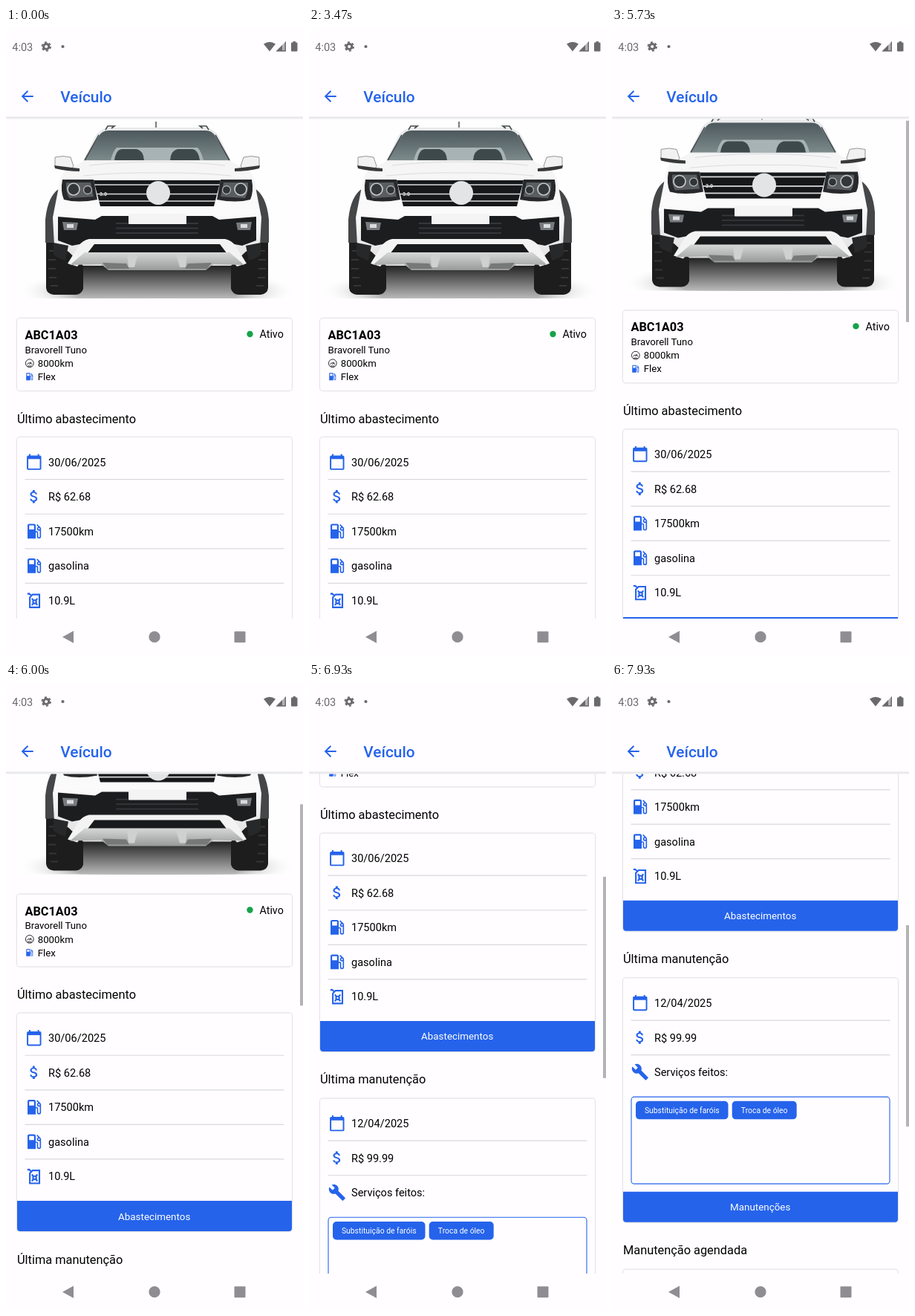
An HTML page that plays this animation: 400x844 px, repeating every 8000 ms.

```html
<!DOCTYPE html>
<html lang="pt-BR">
<head>
<meta charset="utf-8">
<title>Veículo</title>
<style>
  html, body { margin: 0; width: 100%; height: 100%; overflow: hidden; background: #fffdff; }
  svg { display: block; width: 100%; height: 100%; font-family: Roboto, sans-serif; }
  .card { fill: #fffdff; filter: drop-shadow(0 .8px 1.2px rgba(0, 0, 0, .28)); }
  .blue { fill: #2563eb; }
  .line { stroke: #d9d8db; stroke-width: 1.2; }
  .h { font-size: 16.35px; }
  .row { font-size: 14.55px; }
  .small { font-size: 13.2px; }
  .btn { font-size: 13.4px; fill: #fff; text-anchor: middle; }
  .chip { font-size: 10.4px; fill: #fff; text-anchor: middle; }
</style>
</head>
<body>
<svg viewBox="0 0 400 844">
  <defs>
    <clipPath id="view"><rect y="121" width="400" height="674"/></clipPath>
    <clipPath id="photo"><rect x="15" y="121" width="370" height="243"/></clipPath>
    <radialGradient id="ground">
      <stop offset="0" stop-color="#4a4a4a"/><stop offset=".55" stop-color="#999"/>
      <stop offset="1" stop-color="#fff" stop-opacity="0"/>
    </radialGradient>
    <linearGradient id="under" x2="0" y2="1">
      <stop offset="0" stop-color="#1c1c1c"/><stop offset="1" stop-color="#b9b9b9"/>
    </linearGradient>
    <linearGradient id="glass" x2="0" y2="1">
      <stop offset="0" stop-color="#4c585b"/><stop offset="1" stop-color="#7d8a8c"/>
    </linearGradient>
    <linearGradient id="paint" x2="0" y2="1">
      <stop offset="0" stop-color="#f4f4f5"/><stop offset=".5" stop-color="#fbfbfc"/>
      <stop offset="1" stop-color="#dededf"/>
    </linearGradient>
    <linearGradient id="skid" x2="0" y2="1">
      <stop offset="0" stop-color="#d6d7d7"/><stop offset="1" stop-color="#989a9a"/>
    </linearGradient>

    <path id="date" d="M20 3h-1V1h-2v2H7V1H5v2H4c-1.1 0-2 .9-2 2v16c0 1.1.9 2 2 2h16c1.1 0 2-.9 2-2V5c0-1.1-.9-2-2-2zm0 18H4V8h16v13z"/>
    <path id="money" d="M11.8 10.9c-2.27-.59-3-1.2-3-2.15 0-1.09 1.01-1.85 2.7-1.85 1.78 0 2.44.85 2.5 2.1h2.21c-.07-1.72-1.12-3.3-3.21-3.81V3h-3v2.16c-1.94.42-3.5 1.68-3.5 3.61 0 2.31 1.91 3.46 4.7 4.13 2.5.6 3 1.48 3 2.41 0 .69-.49 1.79-2.7 1.79-2.06 0-2.87-.92-2.98-2.1h-2.2c.12 2.19 1.76 3.42 3.68 3.83V21h3v-2.15c1.95-.37 3.5-1.5 3.5-3.55 0-2.84-2.43-3.81-4.7-4.4z"/>
    <path id="fuel" d="M18 10a1 1 0 0 1-1-1 1 1 0 0 1 1-1 1 1 0 0 1 1 1 1 1 0 0 1-1 1m-6 0H6V5h6m7.77 2.23l.01-.01-3.72-3.72L15 4.56l2.11 2.11C16.17 7 15.5 7.93 15.5 9a2.5 2.5 0 0 0 2.5 2.5c.36 0 .69-.08 1-.21v7.21a1 1 0 0 1-1 1 1 1 0 0 1-1-1V14a2 2 0 0 0-2-2h-1V5a2 2 0 0 0-2-2H6c-1.11 0-2 .89-2 2v16h10v-7.5h1.5v5A2.5 2.5 0 0 0 18 21a2.5 2.5 0 0 0 2.5-2.5V9c0-.69-.28-1.32-.73-1.77z"/>
    <path id="tool" d="M22.7 19l-9.1-9.1c.9-2.3.4-5-1.5-6.9-2-2-5-2.4-7.4-1.3L9 6 6 9 1.6 4.7C.4 7.1.9 10.1 2.9 12.1c1.9 1.9 4.6 2.4 6.9 1.5l9.1 9.1c.4.4 1 .4 1.4 0l2.3-2.3c.5-.4.5-1.1.1-1.4z"/>
    <g id="can" fill="none" stroke="#2563eb" stroke-width="2.1">
      <path d="M3 3.2 5.5 3l3 3M10 4.2h9.2v17.3H6.3V8zM9 9.5l7.5 9M16.5 9.5l-7.5 9"/>
      <circle cx="12.75" cy="14" r="2.2" fill="#fffdff"/>
    </g>

    <g id="half">
      <path d="M54 285h50v66q-2 7-10 8H64q-9-1-10-9z" fill="#1d1d1e"/>
      <path d="M58 300h9M57 312h10M57 324h10M58 336h10M60 347h10" stroke="#353536" stroke-width="2"/>
      <path d="M72 216q-16 10-19 42v31h22z" fill="#454648"/>
      <path d="M204 177H108L77 195q-6 10-7 24l-7 36 2 38 19 8 20 19h100z" fill="url(#paint)"/>
      <path d="M112 185q42-5 92-5M104 199q48-5 100-4" fill="none" stroke="#dcdcde"/>
      <path d="M204 134h-66q-12 2-18 12l-16 33h100z" fill="#e9eaeb"/>
      <path d="M204 138h-66q-9 0-13 8l-19 32h98z" fill="url(#glass)"/>
      <path d="M204 161h-55q-5 5-8 17h63z" fill="#a7b3b4"/>
      <path d="M146 178q2-14 10-15h20q9 2 10 15z" fill="#3e494b"/>
      <path d="M134 137l3-5h9l-4 3M106 178l19-34" fill="none" stroke="#454b4d" stroke-width="1.6"/>
      <path d="M66 174q11-3 21 0l4 12-3 4q-11-1-22-4z" fill="#f1f1f1" stroke="#555" stroke-width=".6"/>
      <path d="M65 185l24 3 10 1v4q-17 0-33-4z" fill="#38393a"/>
      <path d="M204 205h-86l9 35h77z" fill="#171819"/>
      <path d="M119 211h85M122 223.500h82M125 233h79" fill="none" stroke="#d9dadb" stroke-width="1.7"/>
      <path d="M76 204h42l5 27q-26 5-45 0-5-11-2-27z" fill="#27292b"/>
      <path d="M81 208h33l4 19-33 2q-5-9-4-21z" fill="#595d60"/>
      <circle cx="91" cy="217" r="8" fill="#33373a" stroke="#c3c7c9" stroke-width="1.7"/>
      <circle cx="110" cy="218" r="5.500" fill="#303437" stroke="#aeb3b5" stroke-width="1.3"/>
      <path d="M70 254l50 4 9-5h75v35h-89l-26 5-19-7z" fill="#1c1d1e"/>
      <path d="M76 261l21 1-2 10H78z" fill="#777b7d"/>
      <path d="M82 264h9v5h-9z" fill="#d9dcdd"/>
      <path d="M148 263h56M148 269.500h56M148 276h56" stroke="#34373a" stroke-width="1.8"/>
      <path d="M64 289l20 4-4 20q-13-4-16-8z" fill="#26282a"/>
      <path d="M204 284h-92q-9 2-14 9l-15 24 13 4 23-27h85z" fill="#f3f3f4"/>
      <path d="M204 291h-85l-10 13h95z" fill="#191a1b"/>
      <path d="M204 302h-98l-20 17 42-1 10 8h66z" fill="url(#skid)"/>
      <path d="M130 316l32 1 4 7h-30z" fill="#777979"/>
      <path d="M163 304h15l-5 18h-8z" fill="#cfd0d0"/>
    </g>
  </defs>

  <rect width="400" height="844" fill="#fffdff"/>
  <g clip-path="url(#view)">
    <g id="page">
      <g clip-path="url(#photo)">
        <rect x="15" y="121" width="370" height="243" fill="#fefefe"/>
        <ellipse cx="203.500" cy="354" rx="188" ry="32" fill="url(#ground)"/>
        <rect x="98" y="318" width="211" height="46" fill="url(#under)"/>
        <path d="M202 126v9" stroke="#444" stroke-width="1.4"/>
        <use href="#half"/>
        <use href="#half" transform="matrix(-1 0 0 1 407 0)"/>
        <rect x="165" y="250" width="78" height="14" rx="1" fill="#f4f4f5"/>
        <text x="126" y="226" font-size="7" font-weight="700" fill="#e5e5e5">3.0</text>
        <circle cx="205" cy="222" r="16" fill="#e3e4e6"/>
      </g>
      <g id="cards"></g>
    </g>
    <rect id="bar" x="396" width="4" height="271" fill="#b4b3b5"/>
  </g>

  <rect y="119.500" width="400" height="1.5" fill="#e6e5e8"/>
  <rect y="121" width="400" height="1.5" fill="#eeedf0"/>
  <path class="blue" transform="translate(16.700 80)" d="M20 11H7.83l5.590-5.590L12 4l-8 8 8 8 1.410-1.410L7.830 13H20v-2z"/>
  <text class="blue" x="73.300" y="100.200" font-size="20.800" font-weight="500">Veículo</text>

  <g fill="#6a696b">
    <text x="8.300" y="30.700" font-size="14.500">4:03</text>
    <circle cx="54.200" cy="25" r="3.600" fill="none" stroke="#6a696b" stroke-width="3"/>
    <circle cx="54.200" cy="25" r="5.700" fill="none" stroke="#6a696b" stroke-width="2" stroke-dasharray="3 2.970"/>
    <circle cx="76.500" cy="25" r="2.100"/>
    <path d="M347 21.500q8-5.500 16 0L355 31.500z"/>
    <path d="M377 18v13.500h-13.500z" fill="#b5b4b6"/>
    <path d="M377 18v13.500h-13.500l8.500-8.500v7h3.500V19.500z"/>
    <path d="M384 20.500q0-1 1-1h1.500V18h3.500v1.500h1.500q1 0 1 1v10q0 1-1 1H385q-1 0-1-1z"/>
  </g>
  <g fill="#8f8d91">
    <path d="M91 811.500v16.500l-15-8.250z"/>
    <circle cx="200" cy="819.700" r="7.600"/>
    <rect x="307.500" y="812.200" width="15" height="15" rx="1"/>
  </g>
</svg>
<script>
const LOOP = 8000, START = 5650;

const text = (cls, x, y, s, extra = '') => `<text class="${cls}" x="${x}" y="${y}" ${extra}>${s}</text>`;
const icon = (id, x, y, k) =>
  `<use class="blue" href="#${id}" transform="translate(${x} ${y}) scale(${k}) translate(-12 -12)"/>`;
const card = (y, h) => `<rect class="card" x="15" y="${y}" width="370" height="${h}" rx="4"/>`;
const scale = { date: .97, money: .97, fuel: 1.1, can: 1, tool: 1 };

function rows(top, list) {
  return list.map(([id, label], i) => {
    const y = top + 33.5 + i * 46.55;
    const rule = i < list.length - 1 ? `<path class="line" d="M25.500 ${y + 23.2}H374.500"/>` : '';
    return icon(id, 37.8, y - .3, scale[id]) + text('row', 57, y + 5.2, label) + rule;
  }).join('');
}

function button(y, label) {
  return `<path class="blue" d="M15 ${y}h370v37q0 4-4 4h-362q-4 0-4-4z"/>` + text('btn', 199.7, y + 25.5, label);
}

function chip(x, w, label) {
  return `<rect class="blue" x="${x}" y="1073.500" width="${w}" height="24.500" rx="5"/>` +
    text('chip', x + w / 2, 1089.5, label);
}

document.getElementById('cards').innerHTML =
  card(391, 97) +
  text('', 25.5, 419, 'ABC1A03', 'font-size="16.300" font-weight="700"') +
  '<circle cx="328.500" cy="412" r="4.200" fill="#16a34a"/>' +
  text('', 341.5, 417.2, 'Ativo', 'font-size="14.300"') +
  text('small', 25.5, 437.8, 'Bravorell Tuno') +
  `<g fill="none" stroke="#2a2a2b"><circle cx="31.800" cy="451.300" r="5.400"/>
    <path d="M28.500 453a3.500 3.500 0 0 1 6.600 0M31.500 453l2.500-3.500M29 455h5.600"/></g>` +
  text('small', 42.8, 456, '8000km') +
  icon('fuel', 31.6, 469.3, .55) + text('small', 42.8, 474.1, 'Flex') +

  text('h', 15, 531.6, 'Último abastecimento') +
  card(551, 293.5) +
  rows(551, [['date', '30/06/2025'], ['money', 'R$ 62.68'], ['fuel', '17500km'], ['fuel', 'gasolina'], ['can', '10.9L']]) +
  button(803.5, 'Abastecimentos') +

  text('h', 15, 888, 'Última manutenção') +
  card(908, 328.5) +
  rows(908, [['date', '12/04/2025'], ['money', 'R$ 99.99'], ['tool', 'Serviços feitos:']]) +
  '<rect x="26" y="1067.800" width="348" height="117" rx="4" fill="none" stroke="#2563eb" stroke-width="1.100"/>' +
  chip(32, 124.5, 'Substituição de faróis') + chip(161.7, 87, 'Troca de óleo') +
  button(1195.5, 'Manutenções') +

  text('h', 15, 1280, 'Manutenção agendada') +
  card(1300.5, 300);

// Two flicks of the page: time, offset
const path = [[START, 0], [5800, 28], [6000, 106], [6200, 204], [6400, 282], [6600, 325], [6930, 348.5],
  [7200, 352], [7450, 392], [7700, 462], [7930, 510.5], [LOOP, 517]];
const slope = i => (path[i + 1][1] - path[i][1]) / (path[i + 1][0] - path[i][0]);
const tangent = i => {
  if (i === 0) return 0;
  if (i === path.length - 1) return slope(i - 1);
  const a = slope(i - 1), b = slope(i);
  return 2 * a * b / (a + b);
};

function offset(t) {
  if (t <= START) return 0;
  const i = Math.max(0, path.findIndex(p => p[0] >= t) - 1);
  const [t0, y0] = path[i], [t1, y1] = path[i + 1];
  const d = t1 - t0, u = (t - t0) / d, v = 1 - u;
  return y0 * (1 + 2 * u) * v * v + y1 * u * u * (3 - 2 * u) +
    d * u * v * (tangent(i) * v - tangent(i + 1) * u);
}

const page = document.getElementById('page'), bar = document.getElementById('bar');

function draw(t) {
  const y = offset(t);
  page.setAttribute('transform', `translate(0 ${-y.toFixed(2)})`);
  bar.setAttribute('y', 120.5 + y * .4025);
  bar.setAttribute('visibility', t > START ? 'visible' : 'hidden');
}

const begin = performance.now();
function tick() {
  draw((performance.now() - begin) % LOOP);
  requestAnimationFrame(tick);
}
tick();
</script>
</body>
</html>
```
